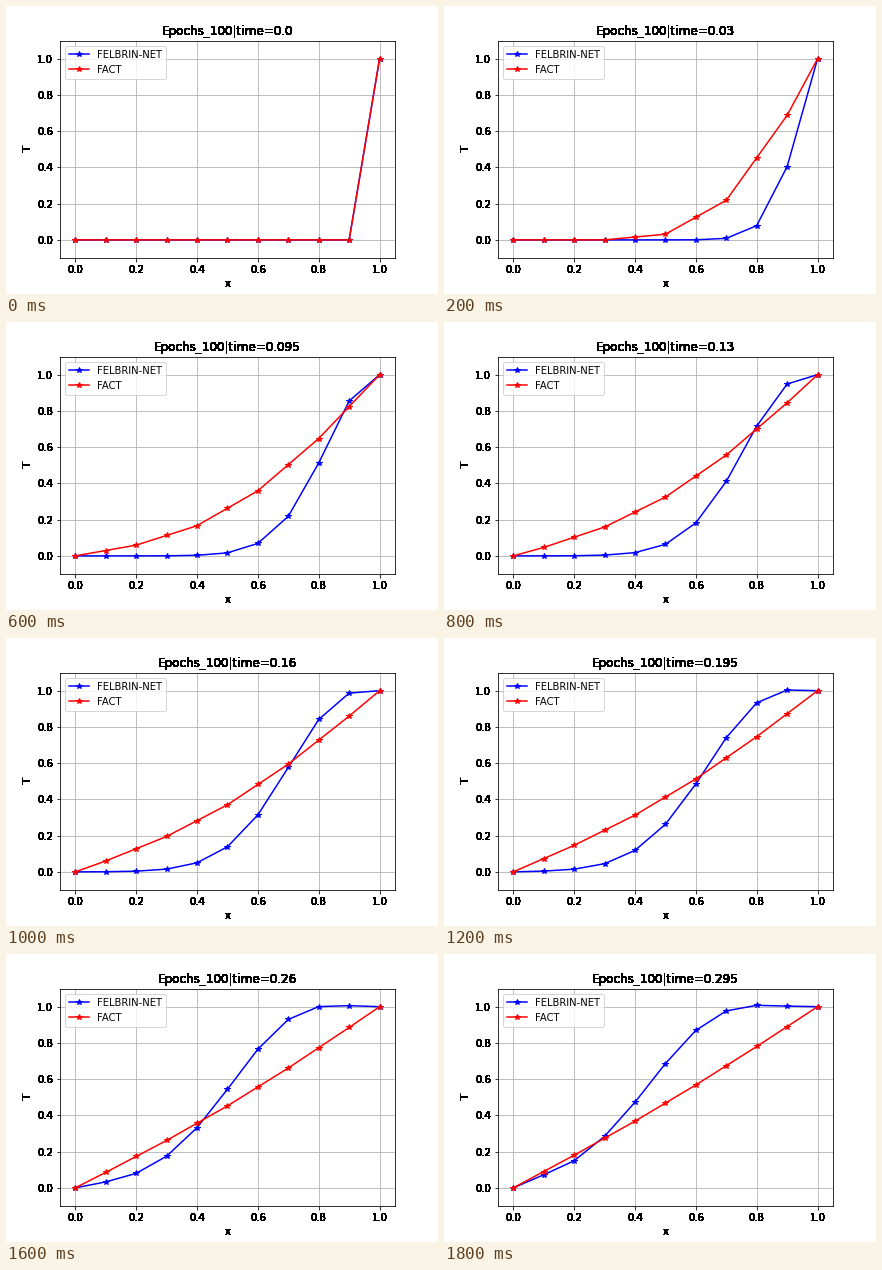
Animation, 432 px wide and 288 px high, one loop 2000 ms. Source, as a matplotlib script:

```python
import numpy as np
import matplotlib.pyplot as plt
from matplotlib.animation import FuncAnimation

FRAMES, INTERVAL = 10, 200
DT, LAST_STEP = 0.005, 59
PASSES = 60  # repeated drawing hardens the antialiased text edges

x = np.linspace(0, 1, 11)


def march(steps, right, left):
    """Three-point explicit stencil with fixed ends, starting from a spike at x = 1."""
    temp = np.zeros(len(x))
    temp[-1] = 1
    for _ in range(steps):
        mid = temp[1:-1]
        temp[1:-1] = mid + right * (temp[2:] - mid) + left * (temp[:-2] - mid)
    return temp


def thicken(text):
    draw_once = text.draw

    def draw(renderer):
        for _ in range(PASSES):
            draw_once(renderer)

    text.draw = draw


fig = plt.figure(figsize=(6, 4), dpi=72)
ax = fig.add_axes([0.125, 0.125, 0.775, 0.755])
ax.set(xlim=(-0.05, 1.05), ylim=(-0.1, 1.1), xlabel="x", ylabel="T",
       xticks=x[::2], yticks=x[::2])
ax.grid(True)

predicted, = ax.plot(x, x, "b-*", label="FELBRIN-NET")
exact, = ax.plot(x, x, "r-*", label="FACT")
ax.legend(loc="upper left")

for text in [ax.title, ax.xaxis.label, ax.yaxis.label,
             *ax.get_xticklabels(), *ax.get_yticklabels()]:
    thicken(text)


def update(i):
    steps = LAST_STEP * i // (FRAMES - 1)
    predicted.set_ydata(march(steps, 0.0786, -0.019))
    exact.set_ydata(march(steps, 0.5, 0.5))
    ax.set_title(f"Epochs_100|time={round(steps * DT, 3)}")
    return predicted, exact


anim = FuncAnimation(fig, update, frames=FRAMES, interval=INTERVAL,
                     repeat=True, repeat_delay=0)
plt.show()
```
